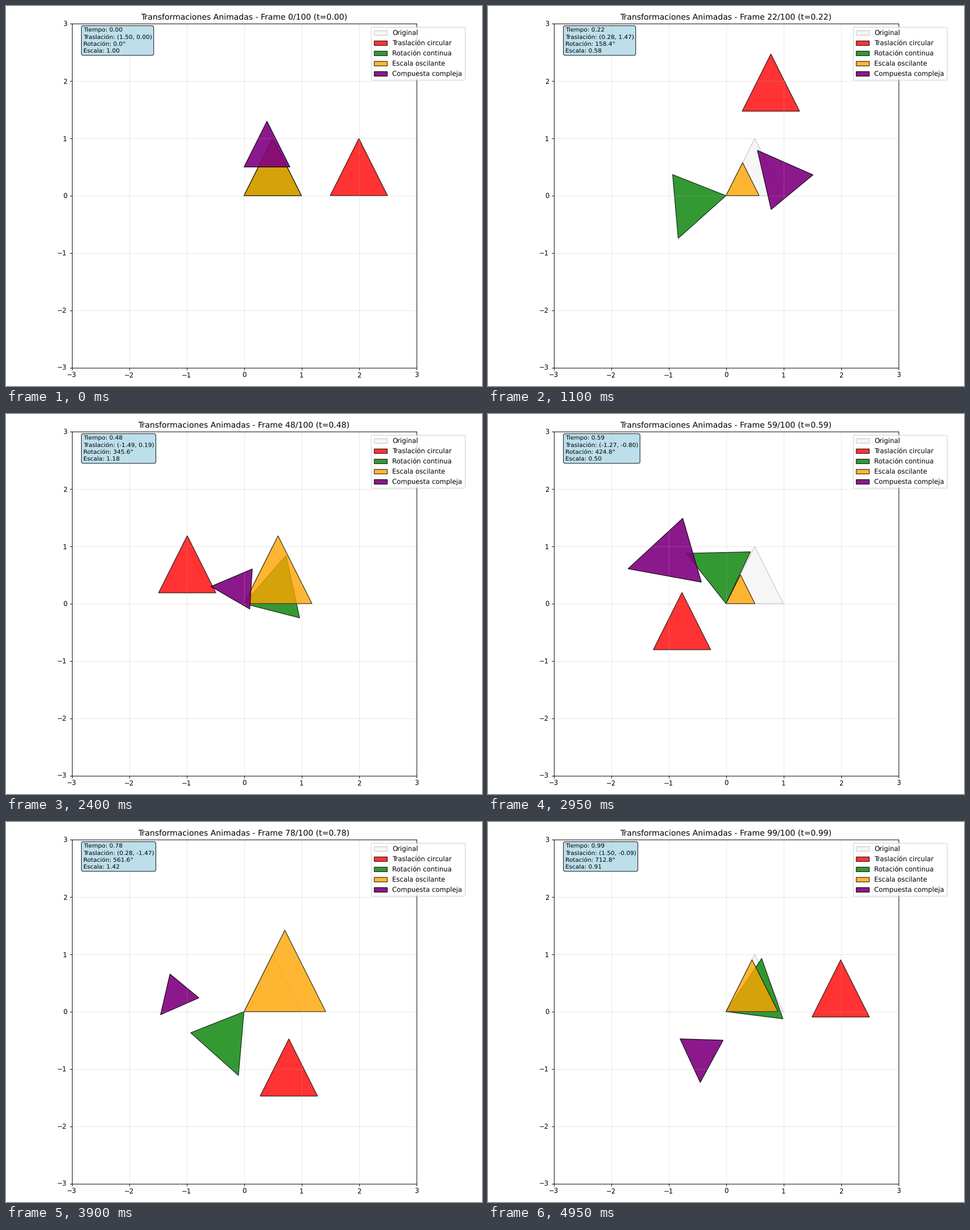
A matplotlib script that plays this animation: 837x669 px, repeating every 5 s.

```python
import matplotlib.pyplot as plt
import numpy as np
from matplotlib.animation import FuncAnimation
from matplotlib.patches import Polygon

WIDTH, HEIGHT, DPI = 837, 669, 83.7
FRAMES, INTERVAL = 100, 50
LEFT, RIGHT, TOP, BOTTOM = 115.5, 721.5, 31.2, 636.6  # plot edges in pixels
BASE = np.array([[0, 0], [1, 0], [0.5, 1]])

plt.rcParams["font.family"] = "DejaVu Sans"
plt.rcParams["text.hinting"] = "no_hinting"


def transform(points, scale=1.0, angle=0.0, shift=(0.0, 0.0)):
    """Scale, then rotate (radians), then translate."""
    c, s = np.cos(angle), np.sin(angle)
    rotation = np.array([[c, -s], [s, c]])
    return scale * points @ rotation.T + np.array(shift)


# The tiny margin keeps the pixel size from being truncated below the whole number.
fig = plt.figure(figsize=(WIDTH / DPI, (HEIGHT + 1e-6) / DPI), dpi=DPI)
ax = fig.add_axes([LEFT / WIDTH, 1 - BOTTOM / HEIGHT,
                   (RIGHT - LEFT) / WIDTH, (BOTTOM - TOP) / HEIGHT])
ax.set_xlim(-3, 3)
ax.set_ylim(-3, 3)
ax.grid(True, alpha=0.3)


def add_triangle(color, alpha, label):
    patch = Polygon(BASE, closed=True, facecolor=color, edgecolor="black",
                    alpha=alpha, label=label)
    return ax.add_patch(patch)


add_triangle("lightgray", 0.2, "Original")
moved = add_triangle("red", 0.8, "Traslación circular")
turned = add_triangle("green", 0.8, "Rotación continua")
scaled = add_triangle("orange", 0.8, "Escala oscilante")
mixed = add_triangle("purple", 0.9, "Compuesta compleja")

ax.legend(loc="upper right", bbox_to_anchor=(1.15, 1), labelspacing=0.55)
title = ax.set_title("")
info = ax.text(-2.8, 2.5, "", fontsize=9, linespacing=1.32,
               bbox=dict(boxstyle="round,pad=0.3", facecolor="lightblue", alpha=0.8))


def update(frame):
    t = frame / FRAMES
    turn = 2 * np.pi * t
    dx, dy = 1.5 * np.cos(turn), 1.5 * np.sin(turn)
    scale = 1 + 0.5 * np.sin(3 * turn)

    moved.set_xy(transform(BASE, shift=(dx, dy)))
    turned.set_xy(transform(BASE, angle=2 * turn))
    scaled.set_xy(transform(BASE, scale=scale))
    mixed.set_xy(transform(BASE,
                           scale=0.8 + 0.4 * np.sin(2 * turn),
                           angle=turn / 2,
                           shift=(0.8 * np.sin(turn), 0.5 * np.cos(1.5 * turn))))

    title.set_text(f"Transformaciones Animadas - Frame {frame}/{FRAMES} (t={t:.2f})")
    info.set_text(f"Tiempo: {t:.2f}\n"
                  f"Traslación: ({dx:.2f}, {dy:.2f})\n"
                  f"Rotación: {720 * t:.1f}°\n"
                  f"Escala: {scale:.2f}")
    return moved, turned, scaled, mixed, title, info


anim = FuncAnimation(fig, update, frames=FRAMES, interval=INTERVAL,
                     repeat=True, repeat_delay=0, blit=False)
plt.show()
```
